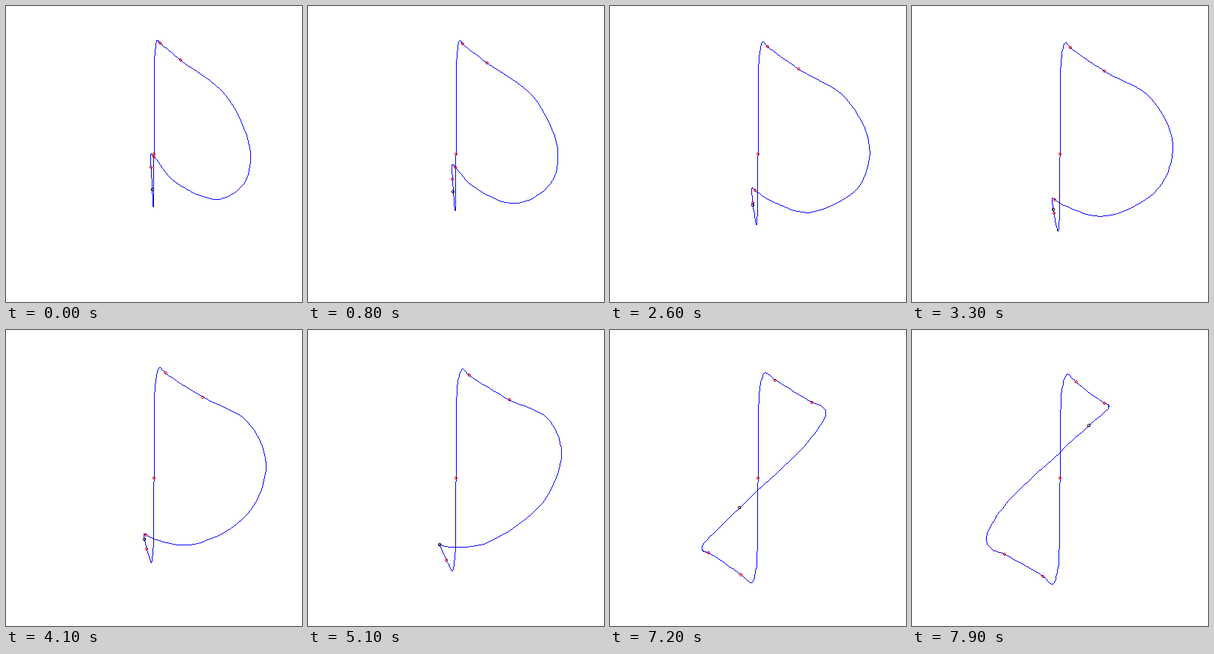
Animation, 400 px wide and 400 px high, one loop 8 s. Source, as an HTML page with a canvas:

```html
<!DOCTYPE html>
<html lang="en">
<head>
<meta charset="utf-8">
<title>Curve with inflection points</title>
<style>
  html, body { margin: 0; width: 100%; height: 100%; overflow: hidden; background: #fff; }
  canvas { display: block; width: 400px; height: 400px; }
</style>
</head>
<body>
<canvas id="stage" width="400" height="400"></canvas>
<script>
const ctx = document.getElementById('stage').getContext('2d');
const LOOP = 8000, STEP = 100;

// Poses: seconds, then x,y pairs along the curve between its upper and lower bends.
const poses = [
  [0, 236,73, 297,121, 329.5,192, 323,237, 288,261, 229,238, 200,204, 195.8,200, 195.8,211, 197,235],
  [2.6, 254.5,85, 319,125, 350.8,191, 335,245, 268,279, 213,261, 196,249, 191.7,246, 192,257, 193.5,270],
  [5.1, 272,94, 323,119, 342.5,166, 317,233, 240,288, 192,293.5, 180,290.5, 178,290.3, 180.5,296, 187,311],
  [6.4, 275,96.5, 305,109, 316,130, 297,177, 212,267, 172,292, 160,297, 157,298.5, 164,303, 182,325],
  [7.9, 260,99, 265.5,101, 265.5,105, 239,129, 200,165, 122,241, 100.3,284, 108,296, 125,303, 177,333]
];

const poly = (s, ...c) => c.reduceRight((sum, k) => sum * s + k, 0);
const topAt = s => [poly(s, 204.3, 0.95, -0.035), poly(s, 46, 0.5, 0.16)];
const bendAt = s => [poly(s, 208, 1.4, 0.2, -0.02), poly(s, 50, 1.4, 0.15)];
const lowAt = s => [poly(s, 199.2, -0.15, -0.13), 305.3 + 38.2 * Math.sin(0.325 * (s - 3.38))];

const mix = (a, b, k) => a.map((v, i) => v + (b[i] - v) * k);

// Catmull-Rom through four vectors with free knots.
function spline(p, k, t) {
  const blend = (a, b, i, j) => mix(a, b, (t - k[i]) / (k[j] - k[i]));
  const a = blend(p[0], p[1], 0, 1), b = blend(p[1], p[2], 1, 2), c = blend(p[2], p[3], 2, 3);
  return blend(blend(a, b, 0, 2), blend(b, c, 1, 3), 1, 2);
}

// The motion is symmetric about MID under a half turn of the stage.
const MID = 7.425;
const halfTurn = key => ({
  s: 2 * MID - key.s,
  v: key.v.map((_, i) => 400 - key.v[24 - i + 2 * (i % 2)])
});

const keys = poses.map(([s, ...v]) => ({ s, v: [...topAt(s), ...bendAt(s), ...v, ...lowAt(s)] }));
keys.push(...keys.slice(-2).map(halfTurn));
keys.unshift({ s: -keys[1].s, v: mix(keys[1].v, keys[0].v, 2) });
keys.sort((a, b) => a.s - b.s);

function knotsAt(s) {
  let i = 1;
  while (i < keys.length - 3 && s >= keys[i + 1].s) i++;
  const near = keys.slice(i - 1, i + 3);
  const v = spline(near.map(k => k.v), near.map(k => k.s), s);
  const pts = [];
  for (let j = 0; j < v.length; j += 2) pts.push([v[j], v[j + 1]]);
  const top = pts[0] = topAt(s), low = pts[pts.length - 1] = lowAt(s);
  const stem = ([x, y], k, dy) => [200 + (x - 200) * k, y + dy];
  return [[200, 200], stem(top, 0.08, 55), stem(top, 0.3, 19), ...pts,
          stem(low, 0.3, -19), stem(low, 0.08, -55)];
}

// Point on the closed curve; u counts knots.
function pointAt(knots, u) {
  const n = knots.length, i = Math.floor(u);
  const p = [-1, 0, 1, 2].map(d => knots[(i + d + n) % n]);
  const k = [0];
  for (let j = 1; j < 4; j++) {
    const gap = Math.hypot(p[j][0] - p[j - 1][0], p[j][1] - p[j - 1][1]);
    k.push(k[j - 1] + Math.sqrt(gap) + 1e-4);
  }
  return spline(p, k, k[1] + (k[2] - k[1]) * (u - i));
}

// Marker positions along the curve: [seconds, u] stops.
const red = [
  [[0, 0]], [[0, 4]], [[0, 5]],
  [[0, 11], [4.1, 11], [5.1, 12], [6.4, 12], [6.95, 13]],
  [[0, 13.33], [4.1, 14]]
];
const black = [[0, 14.3], [2.6, 13.9], [4.1, 13], [5.1, 12], [6.4, 11.5], [6.95, 10], [7.9, 8]];

function track(stops, s) {
  const i = stops.findIndex(p => p[0] > s);
  if (i < 0) return stops[stops.length - 1][1];
  const [a, b] = [stops[i - 1], stops[i]];
  return a[1] + (b[1] - a[1]) * (s - a[0]) / (b[0] - a[0]);
}

// Crisp one-pixel line.
function line(a, b) {
  const [x, y] = a.map(Math.floor);
  const dx = Math.floor(b[0]) - x, dy = Math.floor(b[1]) - y;
  const n = Math.max(Math.abs(dx), Math.abs(dy), 1);
  for (let i = 0; i <= n; i++) {
    ctx.fillRect(Math.round(x + dx * i / n), Math.round(y + dy * i / n), 1, 1);
  }
}

function ring([x, y], r, color) {
  ctx.strokeStyle = color;
  ctx.beginPath();
  ctx.arc(Math.round(x), Math.round(y), r, 0, Math.PI * 2);
  ctx.stroke();
}

function draw(s) {
  const knots = knotsAt(s), parts = 8;
  ctx.fillStyle = '#fff';
  ctx.fillRect(0, 0, 400, 400);
  ctx.fillStyle = '#00f';
  let last = knots[0];
  for (let i = 1; i <= knots.length * parts; i++) {
    const next = pointAt(knots, i / parts);
    line(last, next);
    last = next;
  }
  for (const stops of red) ring(pointAt(knots, track(stops, s)), 1.6, '#f00');
  ring(pointAt(knots, track(black, s)), 1.8, '#000');
}

const start = performance.now();
let shown = -1;
function tick() {
  const t = Math.max(0, performance.now() - start) % LOOP;
  const step = Math.floor(t / STEP);
  if (step !== shown) draw(step * STEP / 1000);
  shown = step;
  requestAnimationFrame(tick);
}
tick();
</script>
</body>
</html>
```
